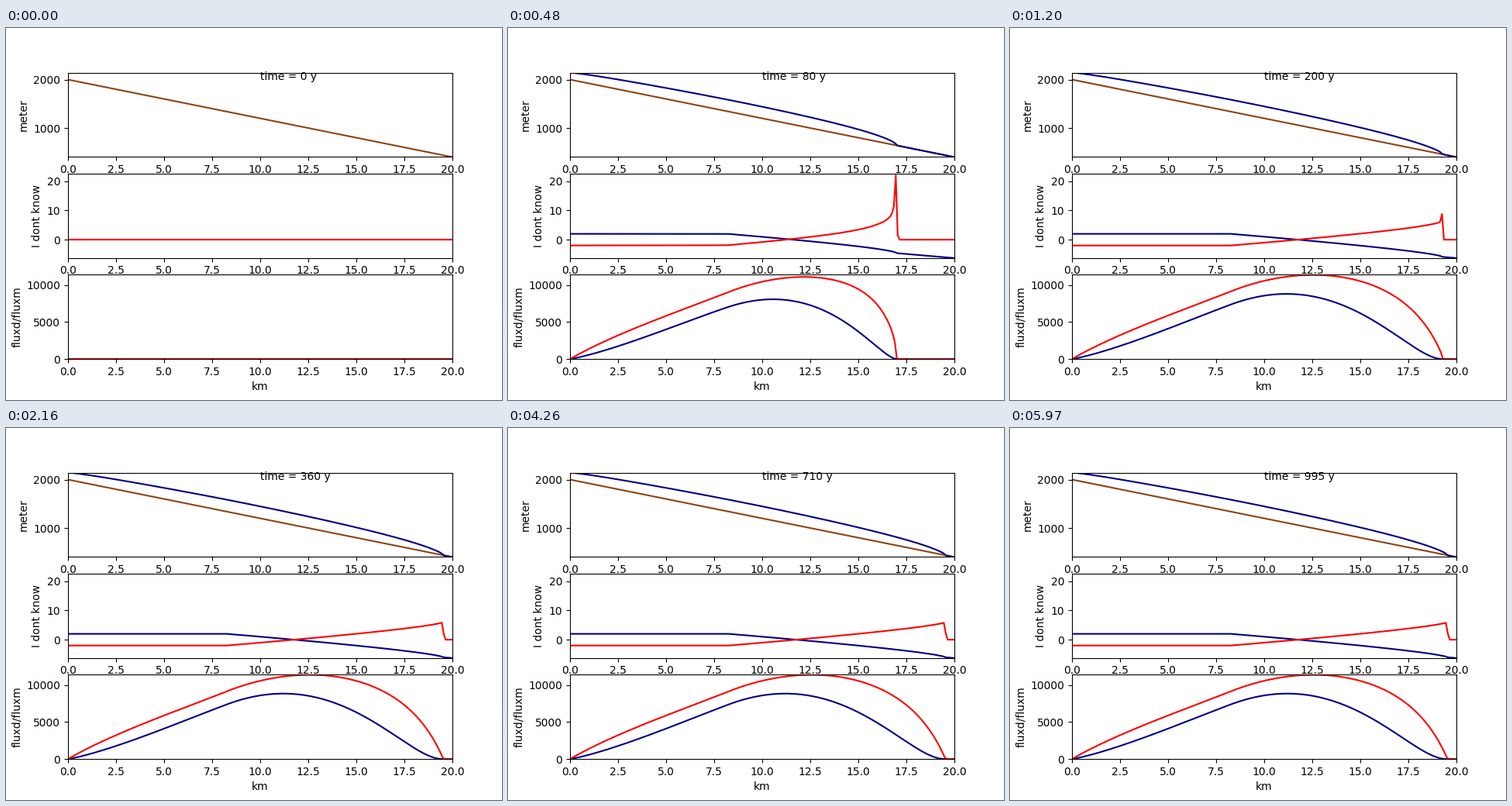
Animation, 640 px wide and 480 px high, one loop 6000 ms. Source, as a matplotlib script:

```python
import numpy as np
import matplotlib.pyplot as plt
from matplotlib.animation import FuncAnimation

FRAMES, INTERVAL = 200, 30
YEARS = 5                  # model years per frame
LEAD = 150                 # years of growth before the clock starts
SETTLED = 110              # the glacier is steady from this frame on

# Grid: ice on cell centres, flux on cell edges
LENGTH, DX = 20000, 100
edge = np.arange(0, LENGTH + DX, DX)
x = edge[:-1] + DX / 2
bed = 2000 - 0.08 * x

# Mass balance
ELA, GRADIENT, CAP = 1300, 0.007, 2.0

# Ice flow
RHO, G, SECONDS = 917, 9.81, 3.156e7
SLIDE = 5.7e-20 * SECONDS * (RHO * G) ** 3
DEFORM = 0.4 * 1.9e-24 * SECONDS * (RHO * G) ** 3
STEPS = 1000
DT = YEARS / STEPS


def simulate():
    """Grow the glacier from bare ground and keep one state per frame."""
    ice = np.zeros_like(x)
    flux = np.zeros_like(edge, dtype=float)
    zero, none = np.zeros_like(x), np.zeros_like(flux)
    states = [(zero, zero, zero, none, none)]
    ratio = DEFORM / SLIDE
    lead = LEAD // YEARS
    for n in range(1, lead + SETTLED + 1):
        for _ in range(STEPS):
            surface = bed + ice
            h = 0.5 * (ice[:-1] + ice[1:])
            drive = h * (surface[:-1] - surface[1:]) / DX
            slide = SLIDE * drive * drive * drive
            deform = slide * h * h * ratio
            flux[1:-1] = slide + deform
            balance = np.minimum(GRADIENT * (surface - ELA), CAP)
            inflow = (flux[:-1] - flux[1:]) / DX
            ice = np.maximum(ice + DT * (balance + inflow), 0)
        if n > lead:
            states.append((bed + ice, balance, inflow,
                           np.pad(deform, 1), np.pad(slide, 1)))
    return states


states = simulate()
top = max(s[0].max() for s in states)
peak = max(s[4].max() for s in states)

fig, (ax_h, ax_b, ax_q) = plt.subplots(3, 1, figsize=(6.4, 4.8), dpi=100)
km, edge_km = x / 1000, edge / 1000

ax_h.plot(km, bed, color="saddlebrown")
lines = [
    ax_h.plot([], [], color="navy")[0],
    ax_b.plot([], [], color="navy")[0],
    ax_b.plot([], [], color="red")[0],
    ax_q.plot([], [], color="navy")[0],
    ax_q.plot([], [], color="red")[0],
]
grids = [km, km, km, edge_km, edge_km]
clock = ax_h.text(10, 2000, "")

panels = [
    (ax_h, "meter", (bed.min(), top)),
    (ax_b, "I dont know", (GRADIENT * (bed.min() - ELA), 22.6)),
    (ax_q, "fluxd/fluxm", (0, peak)),
]
for ax, label, limits in panels:
    ax.set_xlim(0, LENGTH / 1000)
    ax.set_ylim(*limits)
    ax.set_ylabel(label)
ax_q.set_xlabel("km")


def update(i):
    for line, grid, values in zip(lines, grids, states[min(i, SETTLED)]):
        line.set_data(grid, values)
    clock.set_text(f"time = {i * YEARS} y")
    return [*lines, clock]


anim = FuncAnimation(fig, update, frames=FRAMES, interval=INTERVAL,
                     repeat=True, repeat_delay=0)
plt.show()
```
